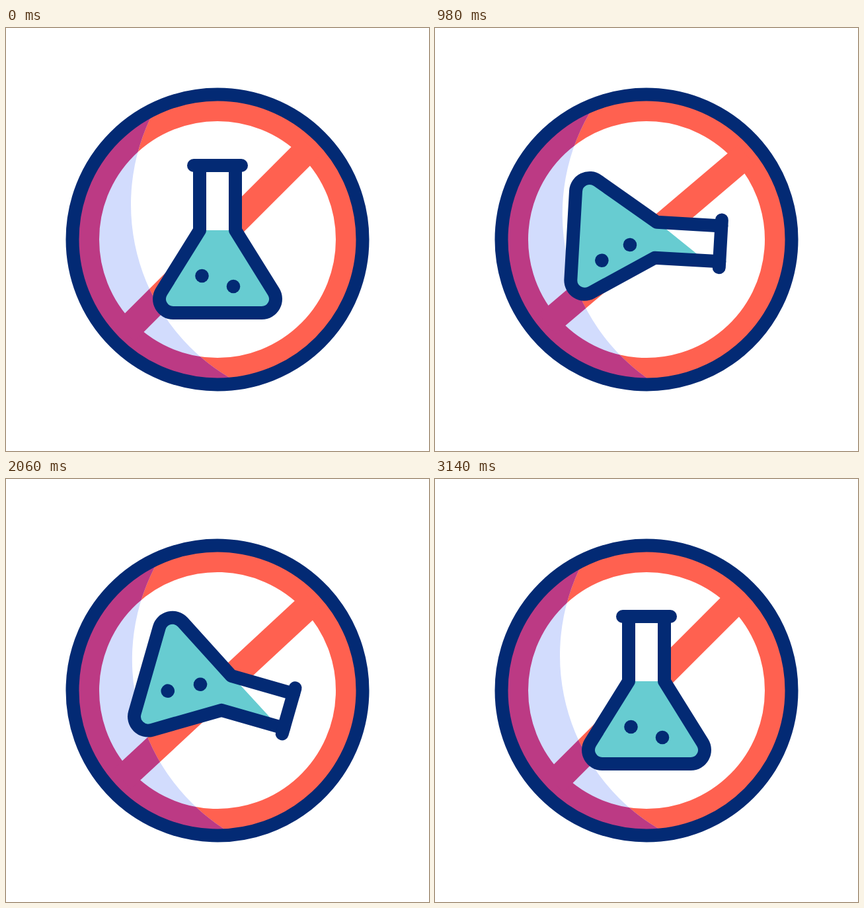
Animation, 640 px wide and 640 px high, one loop 3.6 s. Source, as an HTML page:

```html
<!DOCTYPE html>
<html lang="en">
<head>
<meta charset="utf-8">
<title>No chemicals</title>
<style>
html, body { margin: 0; width: 100%; height: 100%; overflow: hidden; background: #fff; }
svg { display: block; width: 100%; height: 100%; }
.line { fill: none; stroke: #032a74; stroke-width: 20; stroke-linecap: round; stroke-linejoin: round; }
.ban { fill: none; stroke-width: 40; }
</style>
</head>
<body>
<svg viewBox="0 0 640 640">
  <defs>
    <clipPath id="shade">
      <path clip-rule="evenodd" d="M0 0H640V640H0ZM189 267a305 305 0 0 0 610 0a305 305 0 0 0 -610 0Z"/>
    </clipPath>
    <g id="ban" class="ban">
      <circle cx="320" cy="320" r="199"/>
      <path d="M180 460L460 180"/>
    </g>
    <path id="glass" d="M293 208V306L235.2 398.9A21 21 0 0 0 253 431H387A21 21 0 0 0 404.8 398.9L347 306V208"/>
  </defs>
  <g id="sign">
    <use href="#ban" stroke="#ff6150"/>
    <g clip-path="url(#shade)">
      <circle cx="320" cy="320" r="212" fill="#d2dcfd"/>
      <use href="#ban" stroke="#bc3a84"/>
    </g>
    <circle class="line" cx="320" cy="320" r="219.5"/>
  </g>
  <path id="drop" fill="#67ccd1" d="M439.5 405C449 405 469 437 469 455A29.5 28.5 0 0 1 410 455C410 437 430 405 439.5 405Z"/>
  <g id="flask">
    <use href="#glass" fill="#fff"/>
    <path id="liquid" fill="#67ccd1"/>
    <use href="#glass" class="line"/>
    <path class="line" d="M284 208H356"/>
    <circle id="dotA" r="10.3" fill="#032a74"/>
    <circle id="dotB" r="10.3" fill="#032a74"/>
  </g>
</svg>
<script>
const LOOP = 3600, START = 300, END = 3140;
const { PI, sin, cos, max, min } = Math;
const set = (id, attrs) => {
  for (const name in attrs) document.getElementById(id).setAttribute(name, attrs[name]);
};
// Progress from time a to time b, 0 to 1
const span = (t, a, b) => min(1, max(0, (t - a) / (b - a)));
const sine = p => (1 - cos(PI * p)) / 2;

// Adds up eased moves, each given as [from, to, change]
const turn = (t, ...moves) => moves.reduce((sum, [a, b, by]) => sum + by * sine(span(t, a, b)), 0);

function draw(t) {
  // Each turn: wind up, swing, swing back
  const signAngle = turn(t, [START, 680, -15.4], [680, 1250, 36.9], [1250, 2400, -24.2], [2400, 2900, 2.7]);
  const tilt = turn(t, [START, 550, -8.5], [550, 1100, 114.5], [2290, 2500, 10], [2500, END, -116]);
  set('sign', { transform: `rotate(${signAngle} 320 320)` });
  set('flask', { transform: `rotate(${tilt} 320 320)` });

  // The liquid runs up the lower wall of the neck as the flask tips
  const tip = max(0, tilt);
  const left = 306 - 0.12 * tip;
  const right = 306 - 78 * (tip / 106) ** 1.2;
  set('liquid', {
    d: `M300 ${left}L340 ${right}V306L404.8 398.9A21 21 0 0 1 387 431H253A21 21 0 0 1 235.2 398.9L300 306Z`
  });

  // Bubbles lean with the tilt and bob around
  const u = span(t, START, END);
  const swing = 10 * sin(PI * u);
  const swayX = swing * cos(2.4 * PI * (u - 0.17));
  const swayY = swing * cos(2 * PI * (u - 0.85));
  set('dotA', { cx: 296.5 + 0.29 * tip + swayX, cy: 375 - 0.27 * tip + swayY });
  set('dotB', { cx: 344 + 0.06 * tip + swayX, cy: 391 + swayY });

  const fall = span(t, 1040, 1550);
  const size = sine(span(t, 1040, 1170));
  set('drop', {
    transform: `translate(439.5 ${390 + 152 * fall * fall}) scale(${size}) translate(-439.5 -405)`,
    opacity: 1 - span(t, 1450, 1550)
  });
}

function tick() {
  draw(performance.now() % LOOP);
  requestAnimationFrame(tick);
}
tick();
</script>
</body>
</html>
```
